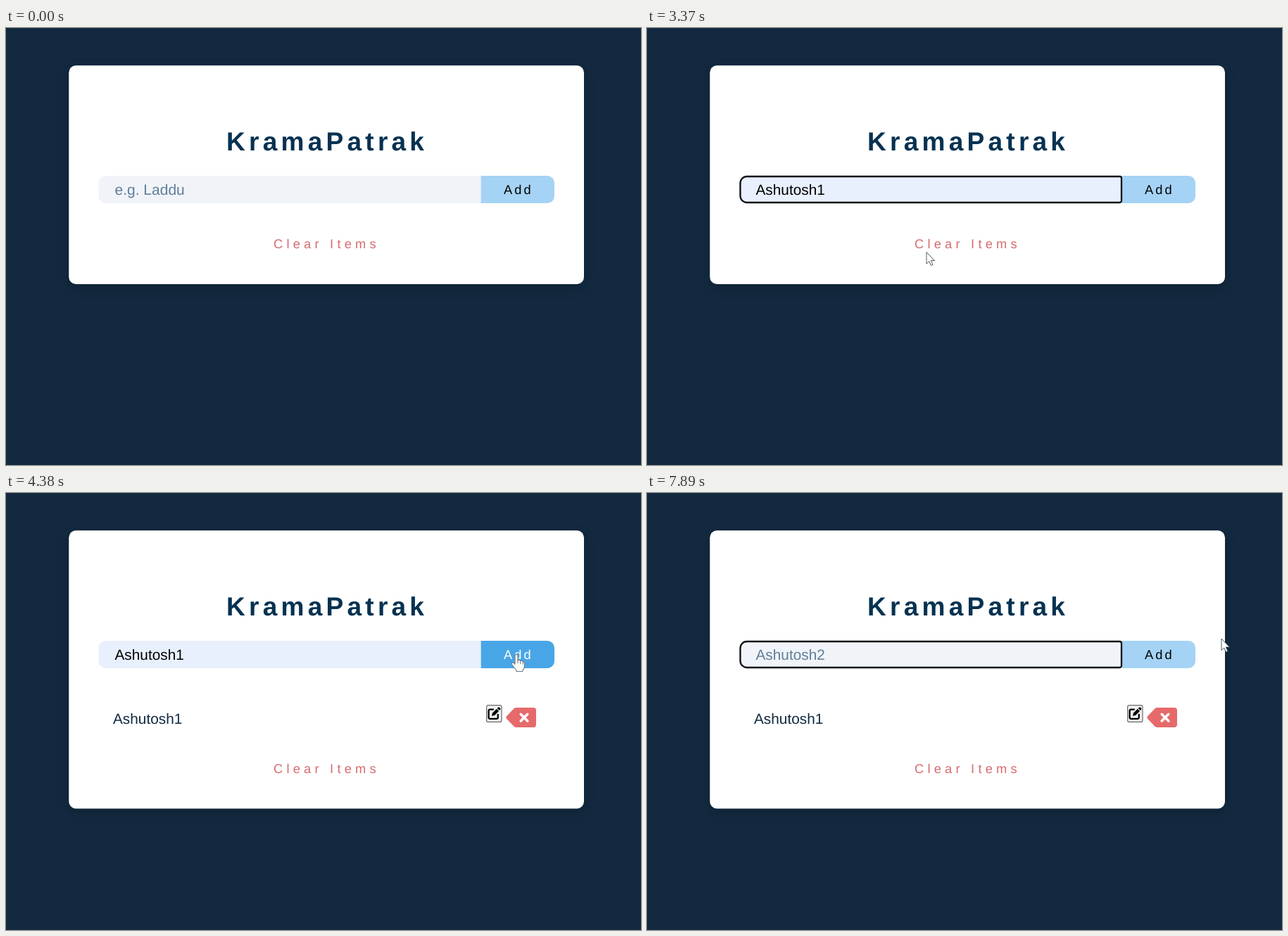
Animation of 902x621 px, one loop 8 s. Source, as an HTML page:

```html
<!DOCTYPE html>
<html lang="en">
<head>
<meta charset="utf-8">
<title>KramaPatrak</title>
<style>
  html, body { margin: 0; width: 100%; height: 100%; overflow: hidden; background: #12293f; }
  svg { display: block; width: 902px; height: 621px; font-family: "Liberation Sans", Arial, sans-serif; text-rendering: geometricPrecision; }
  #card { filter: drop-shadow(0 5px 8px rgba(0, 0, 0, .18)); }
  .title { font-size: 37.1px; font-weight: bold; letter-spacing: 5.22px; fill: #063251; }
  .clear { font-size: 18.3px; letter-spacing: 5.22px; fill: #d66a6c; }
  #add { font-size: 18.3px; letter-spacing: 3.1px; }
  .item { font-size: 20.8px; fill: #102a42; }
</style>
</head>
<body>
<svg viewBox="0 0 902 621">
  <rect width="902" height="621" fill="#12293f"/>
  <rect id="card" x="89.3" y="53.3" width="731.7" rx="10" fill="#fff"/>
  <text class="title" x="313" y="173.5">KramaPatrak</text>

  <path id="field" d="M141.5 210H675V249H141.5a10 10 0 0 1-10-10V220a10 10 0 0 1 10-10z"/>
  <path id="button" d="M674.7 210H769a10 10 0 0 1 10 10V239a10 10 0 0 1-10 10H674.7z"/>
  <path id="ring" d="M142 211H671.5a2.5 2.5 0 0 1 2.5 2.5V245.5a2.5 2.5 0 0 1-2.5 2.5H142a9.5 9.5 0 0 1-9.5-9.5V220.5a9.5 9.5 0 0 1 9.5-9.5z" fill="none" stroke="#0b0d12" stroke-width="2.3"/>
  <text id="value" x="154.5" y="237"></text>
  <rect id="caret" y="218.5" width="1.5" height="22.5" fill="#000"/>
  <text id="add" x="707" y="235.8">Add</text>

  <g id="item">
    <text class="item" x="152" y="327.5">Ashutosh1</text>
    <rect x="682.6" y="301.6" width="21.4" height="23.8" rx="2.5" fill="#efefef" stroke="#6b6b6b" stroke-width="1.2"/>
    <path d="M692 307.6H687.6a2 2 0 0 0-2 2V318.800a2 2 0 0 0 2 2H696.800a2 2 0 0 0 2-2V315" fill="none" stroke="#000" stroke-width="2.3" stroke-linecap="round"/>
    <path d="M690 316.800l.9-4 6-6 3.100 3.100-6 6zM697.700 306l1.300-1.300q1-.8 1.900 0l1.100 1.100q.9 1 0 1.900l-1.300 1.300z"/>
    <path d="M711 317.300L721.600 306.300Q723 305 724.800 305H749a4 4 0 0 1 4 4V329a4 4 0 0 1-4 4H724.800Q723 333 721.600 331.700L711 320.700Q709.600 319 711 317.300z" fill="#e66a6b"/>
    <path d="M731.200 314.300l9.600 9.600m0-9.600l-9.600 9.600" stroke="#fff" stroke-width="3.5" stroke-linecap="round"/>
  </g>
  <text id="clear" class="clear" x="380" y="313.3">Clear Items</text>

  <path id="arrow" d="M0 0V16.500L3.800 13 6.400 19 9 17.900 6.400 12H11.500Z" fill="#fff" stroke="#3a4652" stroke-width=".9"/>
  <path id="hand" d="M-2 14V2.200a2 2 0 0 1 4 0V9.500q.3-1.600 2-1.400t1.800 1.800q.4-1 1.800-.8t1.700 1.800q1.900-.7 2.200 1.400V17q0 3.500-2.600 6V24.500H0V23Q-3.500 19-6 15.300q-1.600-2.600.4-3.300 1.600-.4 3.600 2.300zM2 9.500V13M5.800 10v4M9.300 11v3.500" fill="#fff" stroke="#6d7680" stroke-width="1.1" stroke-linejoin="round"/>
</svg>
<script>
const LOOP = 8000;
const $ = id => document.getElementById(id);
const PALE = '#f0f4f8', FILLED = '#e8f0fe', SLATE = '#617d98';
const START = 154.4, BEFORE_DIGIT = 240.3, END = 252.4;

const text = (value, size, ink) => ({ value, size, ink });
const filled = text('Ashutosh1', 20.8, '#000');
const button = {
  rest: ['#a5d3f5', '#000'],
  half: ['#6db7ee', '#8e9aa5'],
  near: ['#56ade9', '#d3e2ee'],
  hover: ['#49a6e6', '#fff']
};

const base = {
  ...text('e.g. Laddu', 21, SLATE),
  field: PALE, focus: false, caret: 0, button: button.rest,
  arrow: null, hand: null, item: false
};

// Each step changes part of the state from its time onward.
const steps = [
  [370, { arrow: [295, 164.5] }],
  [540, { arrow: [440, 161] }],
  [600, { arrow: [560, 158.5] }],
  [1560, { focus: true, caret: START }],
  [2190, { caret: 0 }],
  [2270, { arrow: null }],
  [2360, { ...text('Ashutosh1', 17.7, '#000'), field: FILLED }],
  [2580, { caret: START }],
  [2810, { ...filled, caret: END }],
  [3370, { caret: 0, arrow: [397, 318.5] }],
  [3500, { arrow: null }],
  [3670, { hand: [689.5, 230.5] }],
  [3850, { hand: [709.5, 243.5], button: button.half }],
  [3920, { hand: [719, 234], button: button.near, caret: END }],
  [4000, { hand: [725, 229], button: button.hover }],
  [4140, { focus: false, caret: 0 }],
  [4380, { item: true }],
  [4580, { hand: null, button: button.half }],
  [4650, { button: button.rest }],
  [5040, { focus: true, caret: END }],
  [5550, { caret: 0 }],
  [6080, { caret: END }],
  [6270, { ...text('Ashutosh', 20.8, SLATE), field: PALE, caret: BEFORE_DIGIT }],
  [6580, { caret: 0 }],
  [7000, { value: 'Ashutosh2', caret: END }],
  [7580, { caret: 0 }],
  [7680, { arrow: [790, 212] }],
  [7790, { arrow: [806, 204] }],
  [7890, { arrow: [816, 207] }]
];

let state = base;
const states = [[0, base], ...steps.map(([time, change]) => [time, state = { ...state, ...change }])];

const set = (id, attrs) => {
  for (const name in attrs) $(id).setAttribute(name, attrs[name]);
};
const show = (id, on) => { $(id).style.display = on ? '' : 'none'; };
const place = (id, point) => {
  show(id, point);
  if (point) set(id, { transform: `translate(${point})` });
};

function draw(s) {
  set('card', { height: s.item ? 395.2 : 310.7 });
  set('clear', { y: s.item ? 397.9 : 313.3 });
  set('field', { fill: s.field });
  set('value', { 'font-size': s.size, fill: s.ink });
  $('value').textContent = s.value;
  set('caret', { x: s.caret });
  set('button', { fill: s.button[0] });
  set('add', { fill: s.button[1] });
  show('ring', s.focus);
  show('caret', s.caret);
  show('item', s.item);
  place('arrow', s.arrow);
  place('hand', s.hand);
}

const origin = performance.now();
let shown;
function tick() {
  const time = (performance.now() - origin) % LOOP;
  const now = states.findLast(([at]) => at <= time)[1];
  if (now !== shown) draw(shown = now);
  requestAnimationFrame(tick);
}
tick();
</script>
</body>
</html>
```
